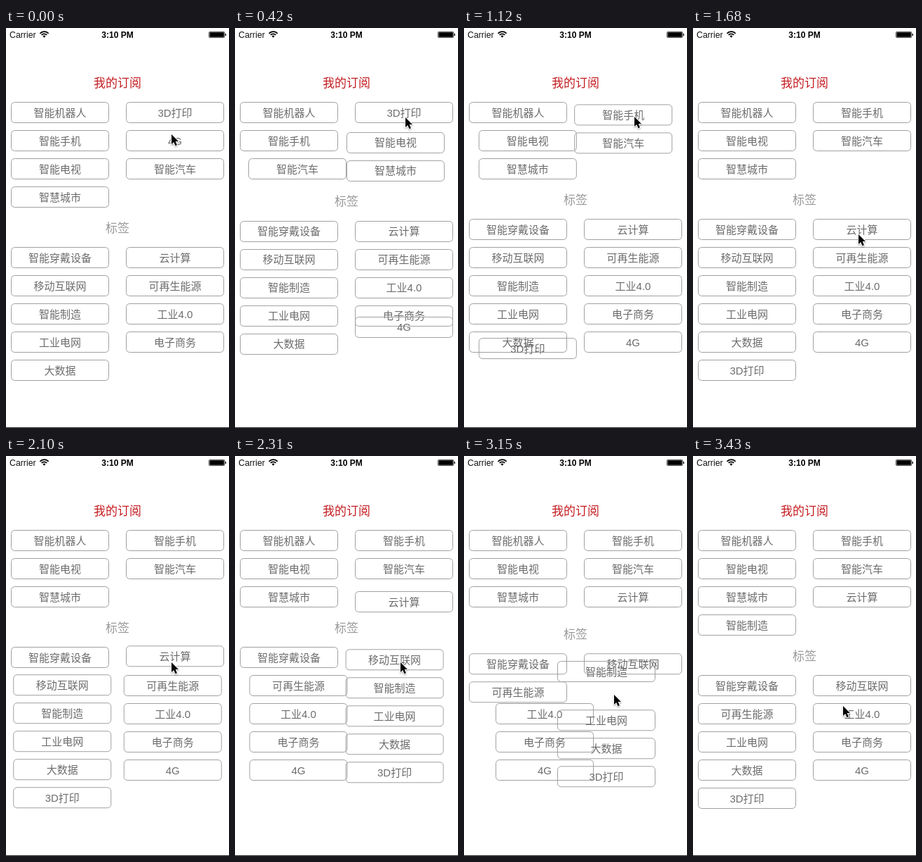
Write an HTML page with a canvas that moves like this. It is 318 by 568 pixels and loops after 3500 ms.

```html
<!DOCTYPE html>
<html lang="zh-CN">
<head>
<meta charset="utf-8">
<title>订阅标签</title>
<style>
  html, body { margin: 0; width: 100%; height: 100%; overflow: hidden; background: #fff; }
  canvas { display: block; width: 318px; height: 568px; }
</style>
</head>
<body>
<canvas id="stage"></canvas>
<script>
const W = 318, H = 568, LOOP = 3500, TICK = 70, DURATION = 300;
const FONT = '"Liberation Sans", "Noto Sans CJK SC", "Noto Sans CJK", sans-serif';

const canvas = document.getElementById('stage');
const ctx = canvas.getContext('2d');
const ratio = window.devicePixelRatio || 1;
canvas.width = W * ratio;
canvas.height = H * ratio;
ctx.scale(ratio, ratio);

const firstState = {
  subs: ['智能机器人', '3D打印', '智能手机', '4G', '智能电视', '智能汽车', '智慧城市'],
  tags: ['智能穿戴设备', '云计算', '移动互联网', '可再生能源', '智能制造',
         '工业4.0', '工业电网', '电子商务', '大数据']
};
const taps = [
  { at: 177, name: '4G' },
  { at: 881, name: '3D打印' },
  { at: 2070, name: '云计算' },
  { at: 3050, name: '智能制造' }
];

// Pointer keys: time, x, y
const pointerPath = [
  [0, 236, 151], [280, 236, 151], [420, 243, 127], [560, 243, 127], [630, 243, 126],
  [1190, 243, 126], [1400, 250, 224], [1680, 236, 293], [2380, 236, 293],
  [2590, 260, 334], [2800, 214, 339], [3290, 214, 339], [3430, 214, 355], [LOOP, 214, 355]
];

const lerp = (a, b, k) => a + (b - a) * k;

// Ease-in-out with control points (.42, 0) and (.58, 1)
function ease(x) {
  if (x <= 0) return 0;
  if (x >= 1) return 1;
  let lo = 0, hi = 1;
  for (let i = 0; i < 24; i++) {
    const s = (lo + hi) / 2, r = 1 - s;
    if (1.26 * s * r * r + 1.74 * s * s * r + s * s * s < x) lo = s; else hi = s;
  }
  return lo * lo * (3 - 2 * lo);
}

// A tapped item goes to the end of the other list.
function toggle({ subs, tags }, name) {
  const without = list => list.filter(item => item !== name);
  return subs.includes(name)
    ? { subs: without(subs), tags: [...tags, name] }
    : { subs: [...subs, name], tags: without(tags) };
}

function layout({ subs, tags }) {
  const offset = Math.ceil(subs.length / 2) * 40;
  const boxes = {};
  const place = (list, top) => list.forEach((name, i) => {
    boxes[name] = { x: 7 + (i % 2) * 164, y: top + Math.floor(i / 2) * 40 };
  });
  place(subs, 105);
  place(tags, 151 + offset);
  return { boxes, label: 123 + offset };
}

const layouts = [layout(firstState)];
taps.reduce((state, tap) => {
  const next = toggle(state, tap.name);
  layouts.push(layout(next));
  return next;
}, firstState);

function text(str, x, y, size, color, align = 'center', weight = '') {
  ctx.font = `${weight} ${size}px ${FONT}`;
  ctx.textAlign = align;
  ctx.fillStyle = color;
  ctx.fillText(str, x, y);
}

function drawStatusBar() {
  text('Carrier', 5, 13.5, 12.3, '#111', 'left');
  text('3:10 PM', 159, 13.5, 12, '#000', 'center', 'bold');

  ctx.strokeStyle = ctx.fillStyle = '#000';
  ctx.lineWidth = 1.7;
  for (const r of [8.3, 5.2]) {
    ctx.beginPath();
    ctx.arc(54.5, 13.5, r, -Math.PI * 0.76, -Math.PI * 0.24);
    ctx.stroke();
  }
  ctx.beginPath();
  ctx.moveTo(54.5, 13.8);
  ctx.arc(54.5, 13.5, 2.8, -Math.PI * 0.76, -Math.PI * 0.24);
  ctx.fill();

  ctx.lineWidth = 0.7;
  ctx.beginPath();
  ctx.roundRect(289.4, 5.4, 22.4, 8.2, 1.4);
  ctx.stroke();
  ctx.fillRect(290.4, 6.2, 20.4, 6.6);
  ctx.fillRect(312.5, 8, 1.3, 3);
}

function drawButton(name, x, y) {
  ctx.strokeStyle = '#a0a0a0';
  ctx.lineWidth = 1;
  ctx.beginPath();
  ctx.roundRect(x + 0.5, y + 0.5, 139, 29, 5);
  ctx.stroke();
  text(name, x + 70, y + 20.5, 15, '#6c6c6c');
}

function drawPointer(x, y) {
  const points = [[0, 0], [0, 14], [3.2, 11], [5.5, 16.3], [7.9, 15.3], [5.7, 10.1], [10, 10]];
  ctx.save();
  ctx.translate(x, y);
  ctx.beginPath();
  points.forEach(([px, py]) => ctx.lineTo(px, py));
  ctx.closePath();
  ctx.lineJoin = 'round';
  ctx.lineWidth = 2;
  ctx.strokeStyle = '#fff';
  ctx.shadowColor = 'rgba(0,0,0,.35)';
  ctx.shadowBlur = 2 * ratio;
  ctx.shadowOffsetY = ratio;
  ctx.stroke();
  ctx.shadowColor = 'transparent';
  ctx.fillStyle = '#000';
  ctx.fill();
  ctx.restore();
}

function pointerAt(t) {
  const i = pointerPath.findIndex(key => key[0] > t);
  const [t0, x0, y0] = pointerPath[i - 1];
  const [t1, x1, y1] = pointerPath[i];
  const k = (t - t0) / (t1 - t0);
  return [lerp(x0, x1, k), lerp(y0, y1, k)];
}

function draw(t) {
  const step = taps.filter(tap => tap.at <= t).length;
  const to = layouts[step];
  const from = layouts[Math.max(0, step - 1)];
  const k = step ? ease((t - taps[step - 1].at) / DURATION) : 1;

  ctx.fillStyle = '#fff';
  ctx.fillRect(0, 0, W, H);
  drawStatusBar();
  text('我的订阅', 159, 83.5, 17, '#c41c20');
  text('标签', 159, lerp(from.label, to.label, k) + 6.5, 17, '#999');
  for (const name in to.boxes) {
    const a = from.boxes[name], b = to.boxes[name];
    drawButton(name, lerp(a.x, b.x, k), lerp(a.y, b.y, k));
  }
  ctx.fillStyle = '#222';
  ctx.fillRect(0, H - 1, W, 1);
  drawPointer(...pointerAt(t));
}

function tick() {
  const t = performance.now() % LOOP;
  draw(Math.floor(t / TICK) * TICK);
  requestAnimationFrame(tick);
}
tick();
</script>
</body>
</html>
```
